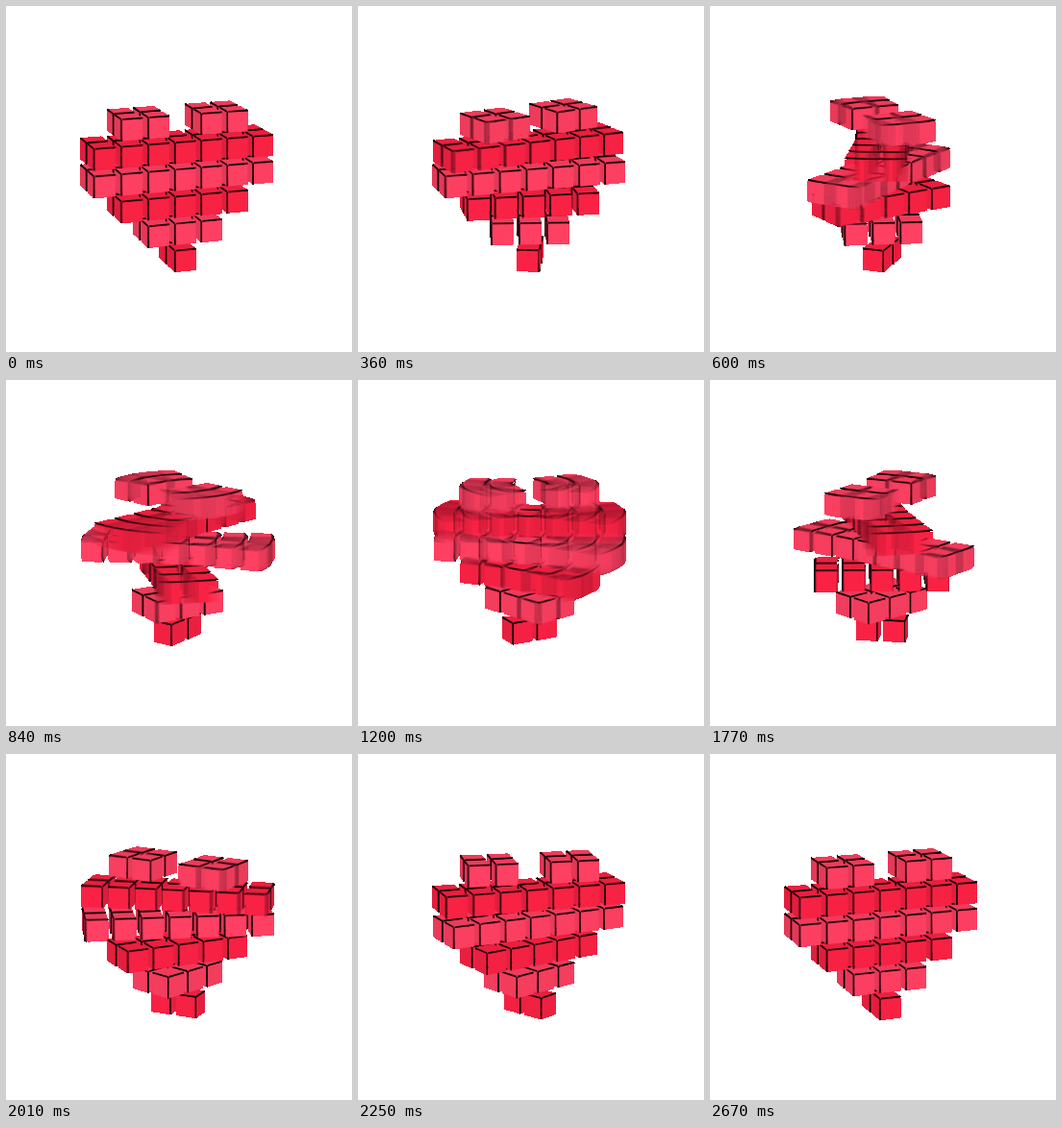
These frames come from a looping animation (360x360 px, 2700 ms). An HTML page with a canvas:

```html
<!DOCTYPE html>
<html lang="en">
<head>
<meta charset="utf-8">
<title>Twisting cube heart</title>
<style>
  html, body { margin: 0; height: 100%; overflow: hidden; background: #fff; }
  canvas { display: block; width: 360px; height: 360px; }
</style>
</head>
<body>
<canvas id="stage" width="360" height="360"></canvas>
<script>
const LOOP = 2700, STEP = 30, SIZE = 360;
const CENTER_X = 178.6, CENTER_Y = 188.5;
const UNIT = 28.6, HALF = 0.415, INSET = 0.04, CAMERA = 55;
const TILT_SIN = 0.26, TILT_COS = 0.966;
const START_ANGLE = 18;
const PINK = [255, 64, 98], RED = [250, 34, 68];

// Columns of each layer, top to bottom; every layer is two cubes deep.
const LAYERS = [
  [-2, -1, 1, 2],
  [-3, -2, -1, 0, 1, 2, 3],
  [-3, -2, -1, 0, 1, 2, 3],
  [-2, -1, 0, 1, 2],
  [-1, 0, 1],
  [0]
];

const stage = document.getElementById('stage').getContext('2d');
const buffer = document.createElement('canvas');
buffer.width = buffer.height = SIZE;
const pen = buffer.getContext('2d', { willReadFrequently: true });
pen.lineWidth = 1.7;
pen.strokeStyle = '#180006';

function bezier(s, a, b) {
  return 3 * s * (1 - s) * (1 - s) * a + 3 * s * s * (1 - s) * b + s * s * s;
}

function ease(x) {
  let low = 0, high = 1;
  for (let i = 0; i < 30; i++) {
    const mid = (low + high) / 2;
    if (bezier(mid, 0.56, 0.24) < x) low = mid; else high = mid;
  }
  return bezier(low, 0, 1);
}

// The whole heart turns steadily; each higher layer adds one more eased turn.
function layerAngle(layer, t) {
  return START_ANGLE - 180 * t + 360 * (5 - layer) * ease(t);
}

function shade(color, light) {
  return `rgb(${color.map(c => Math.round(c * light))})`;
}

function trace(points) {
  pen.beginPath();
  points.forEach(p => pen.lineTo(p[0], p[1]));
}

function fillFace(points, style) {
  trace(points);
  pen.fillStyle = style;
  pen.fill();
}

function inkLine(...points) {
  trace(points);
  pen.stroke();
}

function drawLayer(layer, t) {
  const angle = layerAngle(layer, t) * Math.PI / 180;
  const cos = Math.cos(angle), sin = Math.sin(angle);
  const color = layer % 2 ? RED : PINK;
  const level = layer - 2.5;
  const inner = HALF - INSET;

  const depthOf = (x, z) => z * cos - x * sin;
  const project = (x, y, z) => {
    const depth = depthOf(x, z);
    const scale = UNIT / (1 - depth / CAMERA);
    return [
      CENTER_X + (x * cos + z * sin) * scale,
      CENTER_Y + (y * TILT_COS + depth * TILT_SIN) * scale
    ];
  };

  // Each side runs along (z, -x) of its outward normal (x, z).
  const sides = [[0, 1], [1, 0], [0, -1], [-1, 0]]
    .map(([x, z]) => ({ x, z, facing: depthOf(x, z) }));
  const cubes = LAYERS[layer].flatMap(x => [[x, -0.5], [x, 0.5]]);
  cubes.sort((a, b) => depthOf(a[0], a[1]) - depthOf(b[0], b[1]));

  for (const [cx, cz] of cubes) {
    // Point on a side: distance out, distance along, height.
    const at = (side, out, along, y) => project(
      cx + side.x * out + side.z * along, level + y, cz + side.z * out - side.x * along);
    fillFace(sides.map(side => at(side, inner, inner, -HALF)), shade(color, 0.93));
    sides.forEach((side, i) => {
      if (side.facing <= 0) return;
      fillFace([
        at(side, HALF, -inner, -inner), at(side, HALF, inner, -inner),
        at(side, HALF, inner, inner), at(side, HALF, -inner, inner)
      ], shade(color, 0.84 + 0.16 * side.facing));
      inkLine(at(side, HALF, -inner, -HALF), at(side, HALF, inner, -HALF));
      if (sides[(i + 1) % 4].facing > 0) {
        inkLine(at(side, HALF, HALF, -HALF), at(side, HALF, HALF, inner));
      }
    });
  }
}

// Averages the moments of the past step; any covered pixel becomes opaque.
function renderStep(step) {
  const t = step * STEP / LOOP, shutter = STEP / LOOP;
  const sweep = Math.abs(layerAngle(0, t) - layerAngle(0, t - shutter));
  const samples = Math.min(28, Math.max(3, Math.ceil(sweep / 1.5)));
  const sums = new Float32Array(SIZE * SIZE * 4);

  for (let n = 0; n < samples; n++) {
    const moment = t - (n + 0.5) / samples * shutter;
    pen.clearRect(0, 0, SIZE, SIZE);
    for (let layer = 5; layer >= 0; layer--) drawLayer(layer, (moment + 1) % 1);
    const { data } = pen.getImageData(0, 0, SIZE, SIZE);
    for (let i = 0; i < data.length; i += 4) {
      const alpha = data[i + 3];
      if (!alpha) continue;
      for (let c = 0; c < 3; c++) sums[i + c] += data[i + c] * alpha;
      sums[i + 3] += alpha;
    }
  }

  const image = new ImageData(SIZE, SIZE);
  for (let i = 0; i < sums.length; i += 4) {
    const alpha = sums[i + 3];
    if (alpha < samples * 255 * 0.2) continue;
    for (let c = 0; c < 3; c++) image.data[i + c] = sums[i + c] / alpha;
    image.data[i + 3] = 255;
  }
  return image;
}

const rendered = [];
let shown = -1;

function play() {
  const step = Math.floor(performance.now() % LOOP / STEP);
  if (step !== shown) {
    rendered[step] = rendered[step] || renderStep(step);
    stage.putImageData(rendered[step], 0, 0);
    shown = step;
  }
  requestAnimationFrame(play);
}
play();
</script>
</body>
</html>
```
